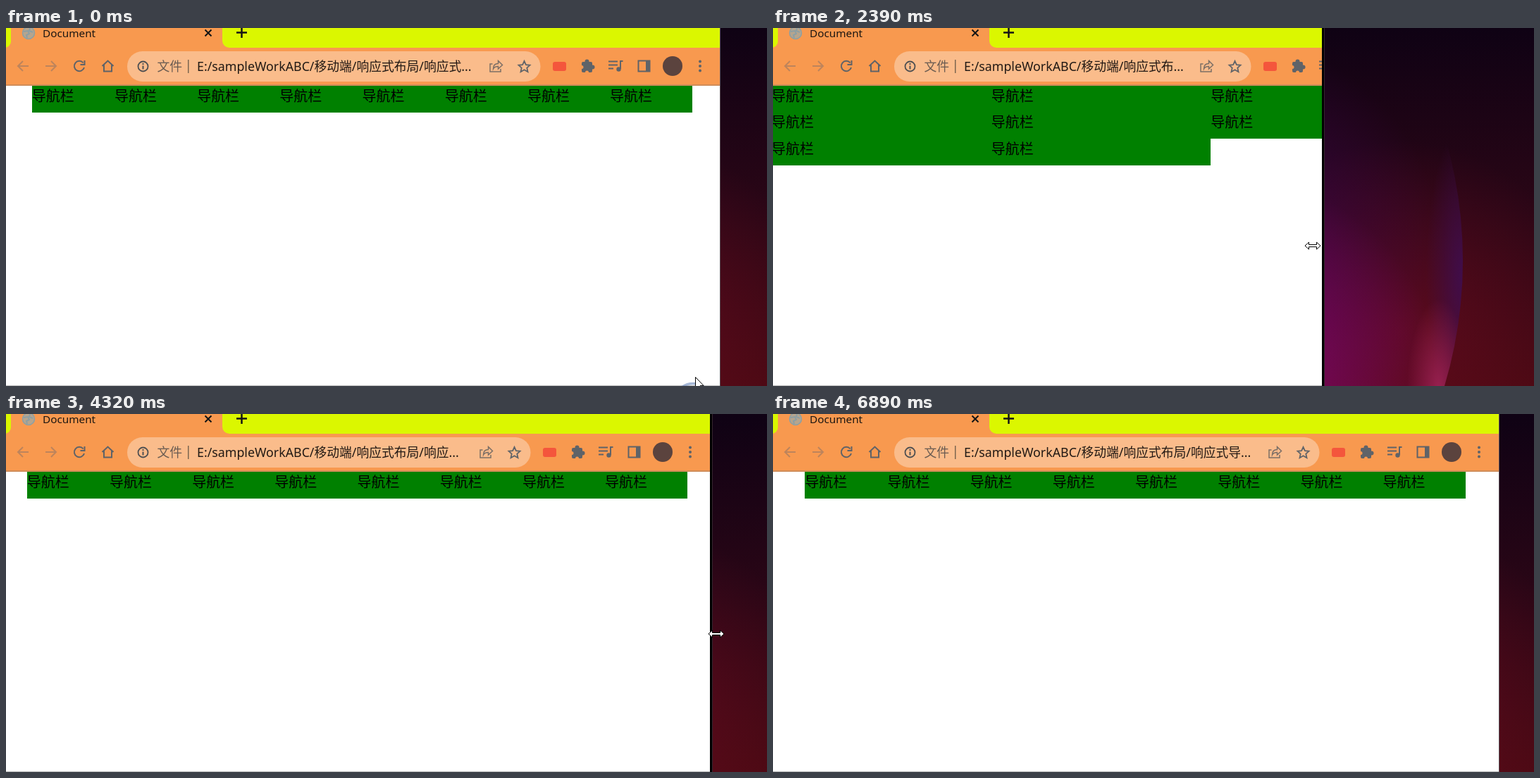
Write an HTML page with a canvas that moves like this. It is 1080 px wide and 508 px high and loops after 7040 ms.

```html
<!DOCTYPE html>
<html lang="zh">
<head>
<meta charset="utf-8">
<style>
html, body { margin: 0; width: 100%; height: 100%; overflow: hidden; background: #fff; }
canvas { display: block; }
</style>
</head>
<body>
<canvas id="stage" width="1080" height="508"></canvas>
<script>
const ctx = document.getElementById('stage').getContext('2d');
const LOOP = 7040, W = 1080, H = 508;
const STEP = 77, EASE = 1.66, LAG = 2.5;
const FONT = '"Noto Sans", "Noto Sans CJK SC", "Noto Sans CJK", sans-serif';
const CJK = '"Noto Sans CJK SC", "Noto Sans CJK", sans-serif';
const URL_TEXT = 'E:/sampleWorkABC/移动端/响应式布局/响应式导航.html';
const ORANGE = '#f8994f', LIME = '#dbf700', ICON = '#5f6368', DARK = '#151515';

const easeIn = p => p ** EASE;
const easeOut = p => 1 - (1 - p) ** EASE;
const mix = (a, b, p) => a + (b - a) * p;

// edge: window's right side; grip: pointer's distance from it; y: pointer height
const START = { edge: 1013, grip: -35, y: 495 };
const moves = [];

function move(start, end, change, ease = easeOut) {
  const from = moves.length ? moves[moves.length - 1].to : START;
  const steps = Math.round((end - start) / STEP) + 1;
  moves.push({ start, end, steps, from, to: { ...from, ...change }, ease });
}

move(70, 750, { grip: 1, y: 331 });
move(1150, 1310, { y: 303 });
move(1450, 2080, { edge: 933, grip: -17, y: 306 }, easeIn);
move(2310, 2700, { edge: 618, grip: -9, y: 312 });
move(3080, 3770, { edge: 785, grip: 0 }, easeIn);
move(3850, 4470, { edge: 1018, grip: 10 });
move(4780, 5330, { edge: 854, grip: -4, y: 345 });
move(5480, 5800, { edge: 1066, grip: 1, y: 341 });
move(6030, 6250, { edge: 1032, grip: 8 });
move(6420, 6660, { edge: 1030 });

const ripples = [
  { start: -70, x: 975, y: 531 },
  { start: 1450, x: 1014, y: 303 },
  { start: 6150, x: 1040, y: 341 }
];

// Content repaints late while the window shrinks
function stateAt(t) {
  const m = moves.filter(m => m.start <= t).pop();
  if (!m) return { ...START, content: START.edge, dragging: false };
  const { from, to, steps, ease } = m;
  const i = Math.min(steps - 1, Math.floor((t - m.start) / (m.end - m.start) * (steps - 1)));
  const at = (key, n) => mix(from[key], to[key], ease(Math.max(0, n / steps)));
  const edge = Math.round(at('edge', i + 1));
  const dragging = from.edge !== to.edge && i > 0 && i < steps - 1;
  const late = dragging && to.edge < from.edge;
  return {
    edge, dragging, grip: at('grip', i + 1), y: at('y', i + 1),
    content: late ? Math.round(at('edge', i + 1 - LAG)) : edge
  };
}

const STAR = new Path2D('M0-8L2.4-2.8 8-2.2 3.8 1.6 5 7.2 0 4.3-5 7.2-3.8 1.6-8-2.2-2.4-2.8z');
const BACK = new Path2D('M8 0H-7M0-7L-7 0 0 7');
const RELOAD = new Path2D('M5.6-4.6A7.2 7.2 0 1 0 7 2M7.5-8V-2H1.5');
const HOME = new Path2D('M-8 0L0-7.5 8 0M-5.5-2V7.5H5.5V-2');
const SHARE = new Path2D('M-5-3H-8.5V8H6.5V4M-4 4C-4-1-1-3.5 3-3.5V-7.5L9-1.5 3 4V.5C0 .5-2.5 1-4 4z');
const LIST = new Path2D('M-10-6.5H3M-10-1.5H3M-10 3.5H-3M7 4V-7H10.5');
const PANEL = new Path2D('M-8-7.5H8V7.5H-8z');
const LAND = new Path2D('M-7-2L-1-3 1 1-3 3-2 7M2-7L1-3 6-1');
const CLOSE = new Path2D('M-4.5-4.5L4.5 4.5M4.5-4.5L-4.5 4.5');
const PLUS = new Path2D('M-7.5 0H7.5M0-7.5V7.5');
const ARROW = new Path2D('M.5.5V17L4.3 13.4 7 19.5 9.8 18.3 7.2 12.4H12z');
const RESIZE = new Path2D('M-11 0L-5.5-5V-1.5H5.5V-5L11 0 5.5 5V1.5H-5.5V5z');

function rect(color, x, y, w, h, r = 0) {
  ctx.fillStyle = color;
  ctx.beginPath();
  ctx.roundRect(x, y, w, h, r);
  ctx.fill();
}

function disc(color, x, y, r) { rect(color, x - r, y - r, 2 * r, 2 * r, r); }

function ring(color, x, y, r, width) {
  ctx.strokeStyle = color;
  ctx.lineWidth = width;
  ctx.beginPath();
  ctx.arc(x, y, r, 0, 7);
  ctx.stroke();
}

function text(str, x, y, size, color, family = FONT, weight = 400) {
  ctx.font = `${weight} ${size}px ${family}`;
  ctx.fillStyle = color;
  ctx.fillText(str, x, y);
}

function icon(path, x, y, { stroke = ICON, fill, width = 2, flip = 1 } = {}) {
  ctx.save();
  ctx.translate(x, y);
  ctx.scale(flip, 1);
  ctx.lineWidth = width;
  if (fill) { ctx.fillStyle = fill; ctx.fill(path); }
  ctx.strokeStyle = stroke;
  ctx.stroke(path);
  ctx.restore();
}

function glow(x, y, r, rgb, alpha, squash = 1) {
  const g = ctx.createRadialGradient(0, 0, 0, 0, 0, r);
  g.addColorStop(0, `rgba(${rgb},${alpha})`);
  g.addColorStop(1, `rgba(${rgb},0)`);
  ctx.save();
  ctx.translate(x, y);
  ctx.scale(squash, 1);
  disc(g, 0, 0, r);
  ctx.restore();
}

function wallpaper() {
  const base = ctx.createLinearGradient(0, 0, 0, H);
  ['#0f0214', '#2a0616', '#480912'].forEach((c, i) => base.addColorStop(i / 2, c));
  rect(base, 0, 0, W, H);
  glow(890, 430, 270, '112,12,34', 0.6);
  glow(640, 320, 310, '66,4,98', 0.7);
  glow(650, 510, 300, '144,6,122', 0.85);
  ctx.save();
  ctx.beginPath();
  ctx.arc(357, 330, 622, 0, 7);
  ctx.clip();
  glow(979, 350, 210, '62,14,84', 0.85, 0.25);
  glow(945, 515, 130, '175,40,100', 0.75, 0.35);
  ctx.restore();
}

function fitUrl(limit) {
  ctx.font = `17.8px ${FONT}`;
  const fits = str => ctx.measureText(str).width <= limit;
  if (fits(URL_TEXT)) return URL_TEXT;
  let n = URL_TEXT.length;
  while (n > 0 && !fits(URL_TEXT.slice(0, n) + '...')) n--;
  return URL_TEXT.slice(0, n) + '...';
}

function tabStrip(right) {
  const tabRight = Math.min(307, right - 336);
  rect(ORANGE, 0, 0, W, 80);
  rect(LIME, -20, -20, 27, 48, 9);
  rect(LIME, tabRight, -20, W, 48, 10);
  disc('#b6a58e', 32, 7, 9);
  ring('#8d9fa3', 32, 7, 8.5, 1.5);
  icon(LAND, 32, 7, { stroke: '#8d9fa3' });
  text('Document', 52, 13, 15.3, '#1d1712');
  icon(CLOSE, tabRight - 20, 7, { stroke: DARK });
  icon(PLUS, tabRight + 27.5, 6.5, { stroke: DARK, width: 2.5 });
}

function puzzle(x, y) {
  rect(ICON, x - 9, y - 6, 15, 15, 2);
  disc(ICON, x - 1.5, y - 6.5, 3);
  disc(ICON, x + 6.5, y + 1.5, 3);
  disc(ORANGE, x - 9, y + 1.5, 2.5);
  disc(ORANGE, x - 1.5, y + 9, 2.5);
}

function toolbar(right) {
  const y = 54, hasBadge = right > 700;
  const pillRight = right - (hasBadge ? 254.5 : 215);
  icon(BACK, 24, y, { stroke: '#bd845c' });
  icon(BACK, 64, y, { stroke: '#bd845c', flip: -1 });
  icon(RELOAD, 104, y);
  icon(HOME, 144.5, y);

  rect('#fabc8b', 172, 33, pillRight - 172, 43, 21.5);
  ring('#4f5052', 194.5, 54.5, 7, 1.8);
  rect('#4f5052', 193.5, 53.5, 2, 5);
  rect('#4f5052', 193.5, 50, 2, 2);
  text('文件', 214.5, 61, 17.8, '#6a5c52', CJK);
  rect('#7d6650', 258, 45, 1.5, 19);
  text(fitUrl(pillRight - 85 - 271), 271, 61, 17.8, '#221a15');
  icon(SHARE, pillRight - 63, y, { width: 1.5, stroke: '#7c6f66' });
  icon(STAR, pillRight - 23, y + 1, { width: 1.8 });

  if (hasBadge) rect('#f4563c', right - 237, 48, 19, 13, 3);
  puzzle(right - 187, y);
  icon(LIST, right - 148, y);
  disc(ICON, right - 143.5, 58.5, 3.2);
  icon(PANEL, right - 107.5, y);
  rect(ICON, right - 105, 46, 6, 16);
  disc('#5b433e', right - 67, y, 14);
  for (const dy of [-6.5, 0, 6.5]) disc(ICON, right - 28, y + dy, 2);
  rect('#d08d5a', 0, 80, W, 2);
}

function navigation(right) {
  const wide = right >= 962;
  const cols = wide ? 8 : 3;
  const width = wide ? 937.5 : right + 2;
  const left = (right - 2 - width) / 2;
  const cellW = width / cols, cellH = 37.5;
  const each = paint => {
    for (let i = 0; i < 8; i++) paint(left + (i % cols) * cellW, 82 + Math.floor(i / cols) * cellH);
  };
  each((x, y) => {
    const x0 = Math.round(x), y0 = Math.round(y);
    rect('#008000', x0, y0, Math.round(x + cellW) - x0, Math.round(y + cellH) - y0);
  });
  each((x, y) => text('导航栏', x, Math.round(y + 21.5), 20, '#000', CJK, 300));
}

function draw(now) {
  const t = now % LOOP;
  const { edge, content, dragging, grip, y } = stateAt(t);

  wallpaper();
  rect('#5c5058', edge, 0, 1, H);
  if (dragging) {
    rect('#000', edge, 0, 4, H);
    rect('#35252f', edge + 3, 0, 1, H);
  }

  ctx.save();
  ctx.beginPath();
  ctx.rect(0, 0, edge, H);
  ctx.clip();
  rect('#fff', 0, 0, W, H);
  tabStrip(content);
  toolbar(content);
  navigation(content);
  rect('#b8b8b8', 0, 507, W, 1);
  ctx.restore();

  for (const r of ripples) {
    const age = (t - r.start) / 500;
    if (age >= 0 && age < 1) ring(`rgba(80,115,175,${0.6 * (1 - age)})`, r.x, r.y, 26.5, 3.5);
  }
  if (t < 6660) {
    icon(grip < -20 ? ARROW : RESIZE, Math.round(edge + grip), Math.round(y),
      { stroke: '#000', fill: '#fff', width: 1 });
  }
}

function tick() {
  draw(performance.now());
  requestAnimationFrame(tick);
}
tick();
</script>
</body>
</html>
```
